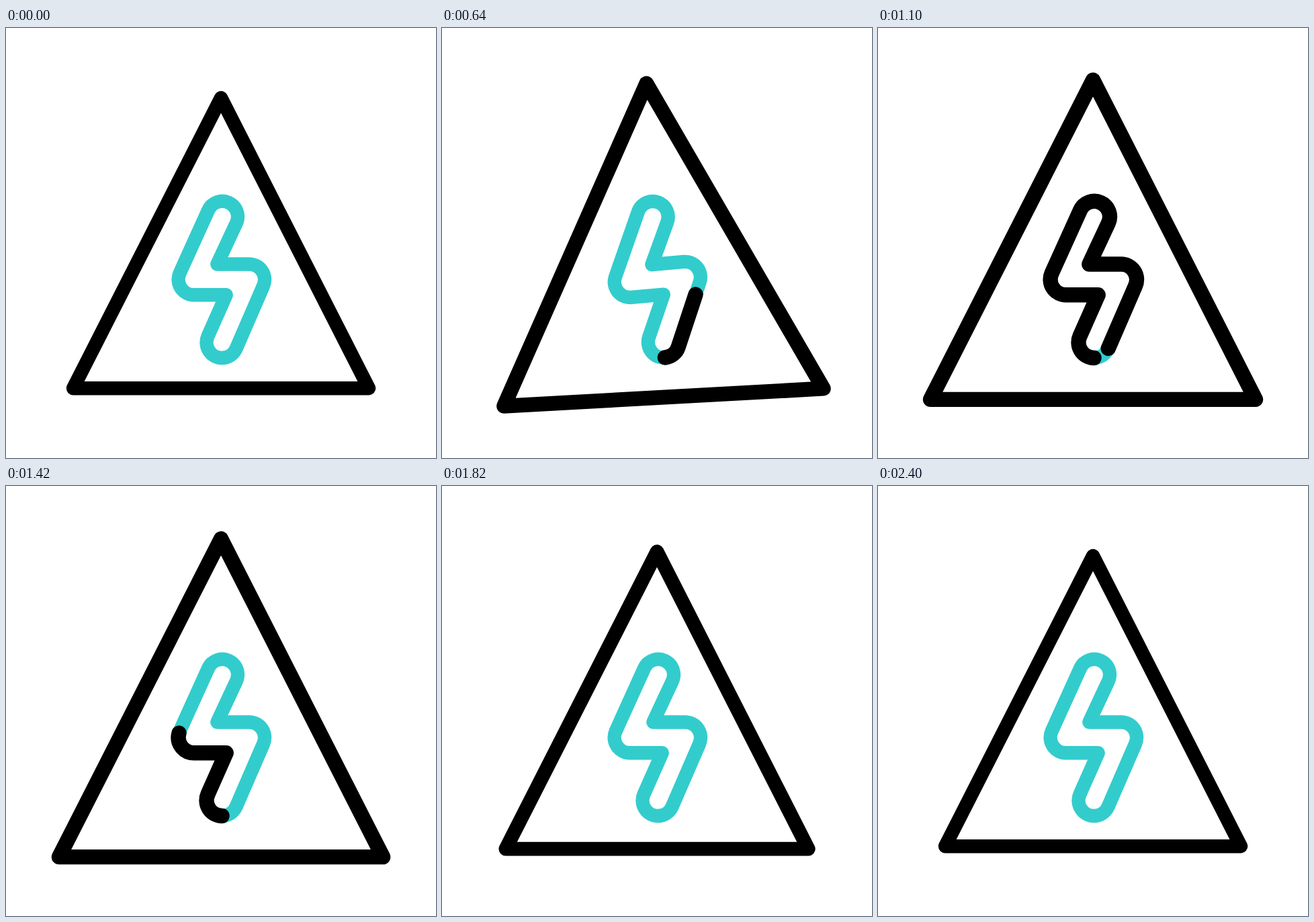
Recreate the animation shown at these times as an HTML page. Size 640 px wide and 640 px high, loop 2420 ms.

```html
<!DOCTYPE html>
<html lang="en">
<head>
<meta charset="utf-8">
<title>High voltage sign</title>
<style>
  html, body { margin: 0; width: 100%; height: 100%; overflow: hidden; background: #fff; }
  svg { display: block; width: 100%; height: 100%; }
  path { fill: none; stroke: #000; stroke-width: 20.4; stroke-linecap: round; stroke-linejoin: round; }
  #bolt { stroke: #3cc; }
  #spark { stroke-width: 22.4; }
</style>
</head>
<body>
<svg viewBox="0 0 640 640">
  <path id="sign" d="M320 104L540 536.2H100Z"/>
  <g id="symbol">
    <path id="bolt"/>
    <path id="spark" pathLength="1"/>
  </g>
</svg>
<script>
const LOOP = 2420;
const CX = 320, CY = 369.5;
const BOLT_X = 321, BOLT_Y = 374.5;
const LEAD = 38; // the bolt shakes slightly ahead of the sign

const OUTLINE = `M321.5 491A23 23 0 0 0 342.4 477.6L382.9 384.1
  A23 23 0 0 0 362 351.5H314.3L342.9 290.3A23 23 0 0 0 301.1 271.1
  L258.6 364.9A23 23 0 0 0 279.5 397.3H327.7L300.6 458.4A23 23 0 0 0 321.5 491`;

// time in ms, angle in degrees
const SHAKE = [[580, 0], [735, -8], [840, 4], [885, 0]];

const [sign, symbol, bolt, spark] =
  ['sign', 'symbol', 'bolt', 'spark'].map(id => document.getElementById(id));
bolt.setAttribute('d', OUTLINE + 'Z');
spark.setAttribute('d', OUTLINE);

const progress = (t, from, span) => Math.min(1, Math.max(0, (t - from) / span));

// Cubic easing with handles (x1, 0) and (x2, 1)
function ease(x, x1 = 0.73, x2 = 0.14) {
  let lo = 0, hi = 1, u = 0.5;
  for (let i = 0; i < 24; i++) {
    u = (lo + hi) / 2;
    const v = 1 - u;
    if (3 * v * v * u * x1 + 3 * v * u * u * x2 + u * u * u < x) lo = u;
    else hi = u;
  }
  return u * u * (3 - 2 * u);
}

const soften = x => 0.35 * x + 0.65 * x * x * (3 - 2 * x);

function shake(t) {
  for (let i = 1; i < SHAKE.length; i++) {
    const [t0, a] = SHAKE[i - 1], [t1, b] = SHAKE[i];
    if (t >= t0 && t < t1) return a + (b - a) * (t - t0) / (t1 - t0);
  }
  return 0;
}

function draw(t) {
  const grow = ease(progress(t, 0, 1130)) - ease(progress(t, 1150, 1260));
  sign.setAttribute('transform',
    `translate(${CX} ${CY}) rotate(${shake(t)}) scale(${1 + 0.1 * grow}) translate(${-CX} ${-CY})`);
  symbol.setAttribute('transform', `rotate(${shake(t + LEAD)} ${BOLT_X} ${BOLT_Y})`);

  const head = soften(progress(t, 515, 560));
  const tail = soften(progress(t, 1056, 560));
  const length = head - tail;
  spark.style.visibility = length > 0.0005 ? 'visible' : 'hidden';
  spark.setAttribute('stroke-dasharray', `${length} 3`);
  spark.setAttribute('stroke-dashoffset', -tail);
}

const start = performance.now();
function tick() {
  draw((performance.now() - start) % LOOP);
  requestAnimationFrame(tick);
}
tick();
</script>
</body>
</html>
```
